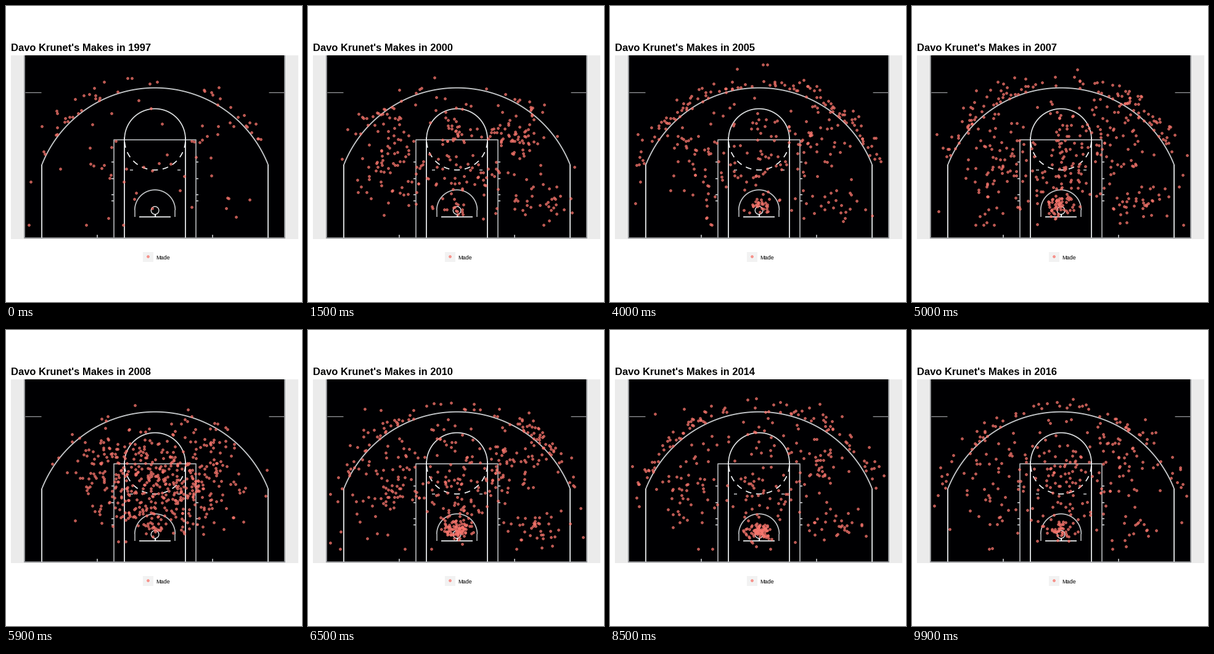
These frames come from a looping animation (480x480 px, 10 s). A matplotlib script:

```python
import numpy as np
import matplotlib.pyplot as plt
from matplotlib.animation import FuncAnimation
from matplotlib.colors import to_rgba
from matplotlib.patches import Rectangle

SIZE, DPI = 480, 80
PX = 72 / DPI                      # points per pixel
RED, WHITE, PALE, GREY = "#f8766d", "#f4f6f8", "#c3c6c9", "#97999c"
FIRST, YEARS, STEPS = 1997, 20, 5
MID, HOOP = 241.6, 331             # court axis and basket height

fig = plt.figure(figsize=(SIZE / DPI, SIZE / DPI), dpi=DPI, facecolor="white")
ax = fig.add_axes([0, 0, 1, 1])
ax.set_xlim(0, SIZE)
ax.set_ylim(SIZE, 0)
ax.axis("off")


def box(x0, y0, x1, y1, color):
    ax.add_patch(Rectangle((x0, y0), x1 - x0, y1 - y0, fc=color, lw=0,
                           antialiased=False))


def line(xs, ys, color, width=1.7):
    ax.plot(xs, ys, color=color, lw=width * PX, solid_capstyle="butt")


def arc(cy, r, a0, a1, color, width=1.7):
    """Arc about the court axis, in degrees, anticlockwise on screen."""
    a = np.radians(np.linspace(a0, a1, 90))
    line(MID + r * np.cos(a), cy - r * np.sin(a), color, width)


def draw_court():
    box(8, 80, 474, 378, "#ebebeb")
    box(29, 80, 453, 377, "#000002")
    for x in (30, 452):
        line([x, x], [80, 377], GREY, 2)
    line([29, 453], [376, 376], GREY)
    for x0, x1 in ((31, 57), (426, 452)):
        line([x0, x1], [139.5, 139.5], GREY, 1.3)
    for x in (148, 335):
        line([x, x], [371, 376], PALE)

    # Lane
    line([175, 175, 308, 308], [376, 217, 217, 376], "#a9abae", 1.8)
    for y in (253, 279.5, 306, 316):
        line([171, 175], [y, y], PALE)
        line([308, 312], [y, y], PALE)
    for x in (201, 278):
        line([x, x + 4.5], [265.5, 265.5], GREY, 2)
    for x in (192.3, 291.2):
        line([x, x], [213, 376], WHITE)
    arc(216, 49.4, 0, 180, "#dfe2e4")
    for a in range(190, 360, 20):
        arc(216.5, 49.4, a - 5.5, a + 5.5, WHITE)

    # Three-point line
    edge = np.degrees(np.arcsin((330 - 257) / 197.2))
    arc(330, 197.3, edge, 180 - edge, PALE, 1.9)
    for x in (58.3, 425):
        line([x, x], [257, 376], WHITE)

    # Basket
    arc(HOOP, 32.8, 0, 180, PALE)
    for x in (208.8, 274.4):
        line([x, x], [HOOP, 342], GREY, 2)
    line([216, 267], [341.5, 341.5], WHITE)
    arc(HOOP + 0.5, 6.3, 0, 360, WHITE, 1.3)
    line([MID, MID], [338, 342], WHITE, 2)


# Two-point zones: share, centre x and y, spread x and y
ZONES = [
    (0.30, 132, 246, 29, 50),      # left side
    (0.25, 332, 212, 28, 33),      # right wing
    (0.13, 368, 318, 26, 16),      # right baseline
    (0.14, MID, 205, 22, 38),      # top of the key
    (0.18, 246, 278, 34, 26),      # paint
]


def threes(rng, n):
    """Makes just outside the arc, mostly from the two wings."""
    side = rng.choice([-1, 1], n)
    a = np.radians(side * np.abs(rng.normal(38, 19, n)))
    r = 198 + np.abs(rng.normal(0, 13, n))
    return np.column_stack([MID + r * np.sin(a), 330 - r * np.cos(a)])


def season(i):
    rng = np.random.default_rng(810 + i)
    total = np.interp(i, [0, 5, 8, 11, 19], [102, 480, 340, 530, 340])
    far = total * np.interp(i, [0, 3, 5, 8, 11, 19],
                            [0.45, 0.07, 0.04, 0.33, 0.15, 0.27])
    rim = total * np.interp(i, [0, 8, 15, 19], [0.01, 0.08, 0.23, 0.16])
    parts = [threes(rng, int(far)),
             rng.normal((MID, 323), (12, 8), (int(rim), 2))]
    for share, cx, cy, sx, sy in ZONES:
        n = int(share * (total - far - rim))
        parts.append(rng.normal((cx, cy), (sx, sy), (n, 2)))
    spots = np.clip(np.vstack(parts), (36, 95), (446, 355))
    return rng.permutation(np.round(spots))


SEASONS = [season(i) for i in range(YEARS)]


def blend(a, b, t):
    """Paired makes travel; surplus ones stay until the change is over."""
    n = min(len(a), len(b))
    spots = a.copy()
    spots[:n] += (b[:n] - a[:n]) * t
    return spots


def dots(xs, ys):
    return ax.scatter(xs, ys, s=(3.6 * PX) ** 2, facecolors=[to_rgba(RED, 0.7)],
                      edgecolors=[to_rgba(RED, 0.8)], linewidths=PX, zorder=5)


draw_court()
makes = dots([], [])
title = ax.text(7.5, 73, "", family="Liberation Sans", weight="bold",
                size=16.55 * PX, va="baseline")
box(222, 399, 239, 415, "#f2f2f2")
dots([229.5], [405.5])
ax.text(243.2, 411, "Made", family="Liberation Sans", size=9 * PX,
        va="baseline")


def update(frame):
    i, step = divmod(frame, STEPS)
    if i == 0:
        t = max(0, step - 2) / 3
    else:
        t = 0.5 if step == STEPS - 1 else 0
    makes.set_offsets(blend(SEASONS[i], SEASONS[(i + 1) % YEARS], t))
    title.set_text(f"Davo Krunet's Makes in {FIRST + i + (t > 0.5)}")
    return makes, title


anim = FuncAnimation(fig, update, frames=YEARS * STEPS, interval=100,
                     repeat=True, repeat_delay=0)
plt.show()
```
